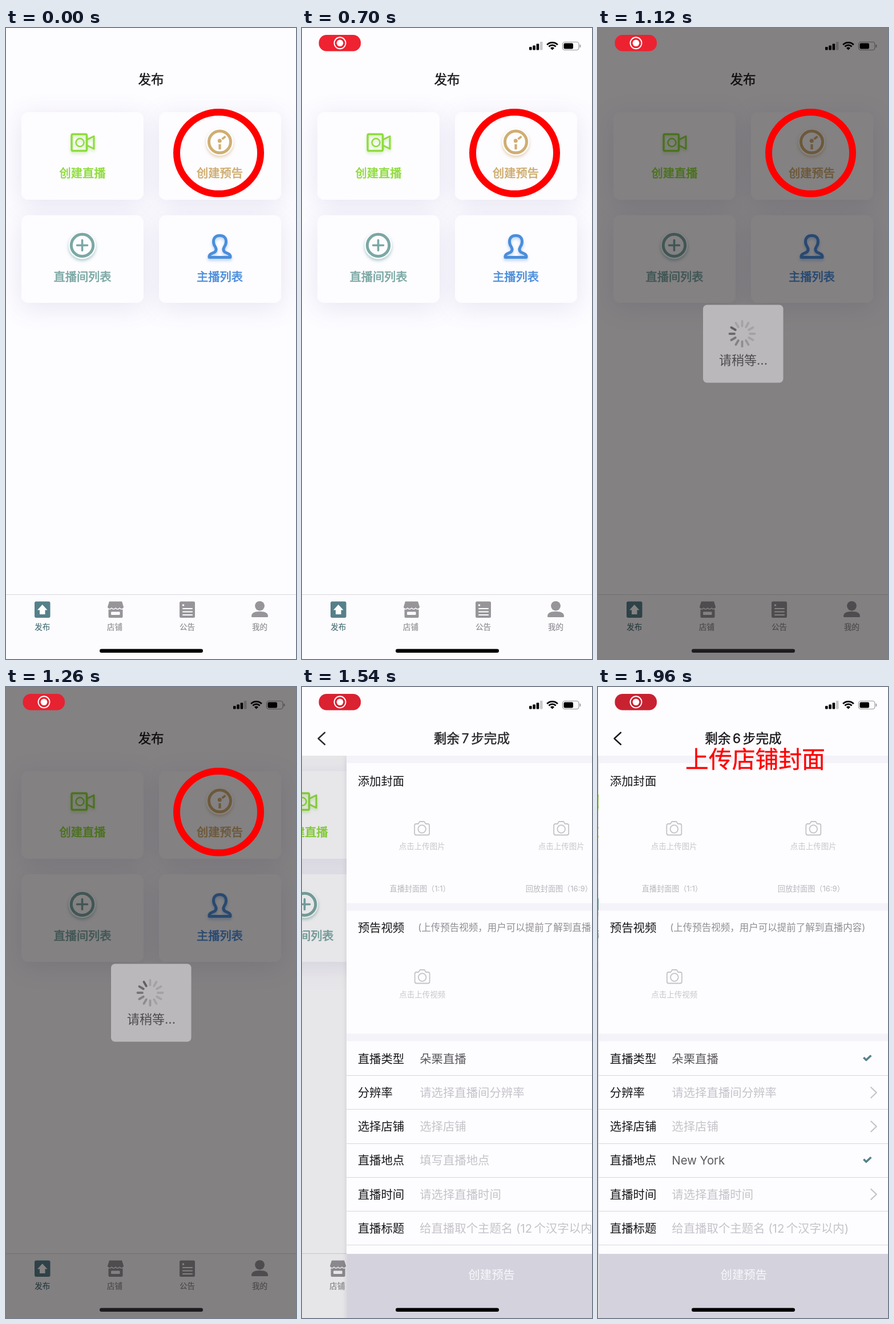
Write an HTML page with a canvas that moves like this. It is 508 px wide and 1102 px high and loops after 2100 ms.

```html
<!DOCTYPE html>
<html lang="zh-CN">
<head>
<meta charset="utf-8">
<style>
html, body { margin: 0; width: 100%; height: 100%; overflow: hidden; background: #fdfcff; }
canvas { display: block; width: 508px; height: 1102px; }
</style>
</head>
<body>
<canvas id="stage" width="508" height="1102" lang="zh-CN"></canvas>
<script>
const ctx = document.getElementById('stage').getContext('2d');
const W = 508, H = 1102, LOOP = 2100, STEP = 140;
const PAPER = '#fdfcff', INK = '#161517', GRAY = '#97959a', TEAL = '#56808a', PALE = '#c5c3c8';
const FONT = 'Inter, "Noto Sans CJK SC", "Noto Sans CJK", sans-serif';
const NAV_H = 120, TAB_Y = 990, PUSH_AT = 1400;

const clamp = v => Math.max(0, Math.min(1, v));

// y is the visual middle of the line; "bold" thickens the glyphs slightly.
function text(str, x, y, size, color, align = 'left', bold = 0) {
  ctx.font = `400 ${size}px ${FONT}`;
  ctx.textAlign = align;
  ctx.fillStyle = ctx.strokeStyle = color;
  ctx.fillText(str, x, y + size * 0.375);
  if (bold) {
    ctx.lineWidth = bold;
    ctx.strokeText(str, x, y + size * 0.375);
  }
}

function rect(x, y, w, h, color, r = 0) {
  ctx.fillStyle = color;
  ctx.beginPath();
  ctx.roundRect(x, y, w, h, r);
  ctx.fill();
}

function disc(x, y, r, color) {
  ctx.fillStyle = color;
  ctx.beginPath();
  ctx.arc(x, y, r, 0, 7);
  ctx.fill();
}

function stroke(path, color, width, cap = 'round') {
  ctx.strokeStyle = color;
  ctx.lineWidth = width;
  ctx.lineCap = cap;
  ctx.lineJoin = 'round';
  ctx.stroke(new Path2D(path));
}

function ring(x, y, r, color, width) {
  ctx.strokeStyle = color;
  ctx.lineWidth = width;
  ctx.beginPath();
  ctx.arc(x, y, r, 0, 7);
  ctx.stroke();
}

function layer(draw, { dx = 0, alpha = 1, shadow, blur = 0, drop = 0 } = {}) {
  ctx.save();
  ctx.translate(dx, 0);
  ctx.globalAlpha = alpha;
  if (shadow) {
    ctx.shadowColor = shadow;
    ctx.shadowBlur = blur;
    ctx.shadowOffsetY = drop;
  }
  draw();
  ctx.restore();
}

function drawCards() {
  const cards = [[27, 147], [268, 147], [27, 327], [268, 327]];
  const drawCard = ([x, y]) => rect(x, y, 214, 153, PAPER, 12);
  layer(() => cards.forEach(drawCard), { shadow: 'rgba(110,100,165,.15)', blur: 44, drop: 8 });
  cards.forEach(drawCard);

  const lift = color => ({ shadow: color, blur: 5, drop: 3 });
  layer(() => disc(374.5, 199, 24, PAPER), lift('rgba(207,174,114,.5)'));
  layer(() => disc(133.5, 379.5, 24, PAPER), lift('rgba(100,160,155,.5)'));

  const green = '#8edc3c', gold = '#cfae72', sage = '#7ba8a4', blue = '#4b8edb';
  layer(() => {
    stroke('M117 185.5H139.5Q141.5 185.5 141.5 188V212Q141.5 214.5 139.5 214.5H117Q115 214.5 115 212V188Q115 185.5 117 185.5Z', green, 3.4);
    stroke('M142 195L154 189V211L142 205', green, 3);
    ring(129.5, 200, 7, green, 2.4);
  }, lift('rgba(130,210,60,.4)'));

  ring(374.5, 199, 19, gold, 5);
  disc(374.3, 197, 3.5, gold);
  stroke('M378.5 194L384.5 189.5', gold, 3.6, 'butt');
  stroke('M374.5 203V212', gold, 4.2, 'butt');

  ring(133.5, 379.5, 19.2, sage, 5);
  stroke('M124.5 379.5H142.5M133.5 370.5V388.5', sage, 3.6);

  layer(() => stroke('M356 400.5Q355 396 361 393.5L365.5 391.5Q370 388 366.5 382Q363.5 378 363.5 373C363.5 366 368 362.5 374.5 362.5S385.5 366 385.5 373Q385.5 378 382.5 382Q379 388 383.5 391.5L388 393.5Q394 396 393 400.5Z', blue, 5),
    lift('rgba(75,142,219,.4)'));

  text('创建直播', 134, 253.5, 20.2, green, 'center', 0.7);
  text('创建预告', 374.5, 253.5, 20.2, gold, 'center', 0.7);
  text('直播间列表', 134, 434, 20.2, sage, 'center', 0.7);
  text('主播列表', 374.5, 434, 20.2, blue, 'center', 0.7);
}

function drawTabs() {
  rect(0, TAB_Y - 1, W, H - TAB_Y + 1, '#fcfbfe');
  rect(0, TAB_Y - 1, W, 1, '#d9d7dc');

  rect(50, 1001.5, 27.5, 28.5, TEAL, 3);
  ctx.fillStyle = '#fff';
  ctx.fill(new Path2D('M63.7 1007L72.5 1016.5H68.5V1024H59V1016.5H55Z'));

  rect(179.5, 1014, 25, 16, GRAY, 2);
  ctx.fillStyle = GRAY;
  ctx.fill(new Path2D('M181 1001.5H203L206 1011Q206 1014 203 1014H181Q178 1014 178 1011Z'));
  stroke('M178 1013q3.5 4 7 0q3.5 4 7 0q3.5 4 7 0q3.5 4 7 0', '#fcfbfe', 1.4);
  rect(184, 1019.5, 15.5, 5.5, '#fcfbfe', 1);

  rect(304, 1001.5, 27, 28.5, GRAY, 2.5);
  disc(310.5, 1008, 1.8, '#fff');
  stroke('M310 1014H326M310 1019.5H326M310 1025H326', '#fff', 2.2);

  disc(444.5, 1009.3, 8.4, GRAY);
  ctx.fillStyle = GRAY;
  ctx.fill(new Path2D('M430 1028Q429.5 1019 444.5 1019T459 1028Q459 1029 457 1029H432Q430 1029 430 1028Z'));

  ['发布', '店铺', '公告', '我的'].forEach((name, i) =>
    text(name, 63.7 + 126.9 * i, 1046, 13.5, i ? '#8e8c90' : '#456f75', 'center', 0.2));
}

function drawPhotoSlot(x, y, label) {
  stroke(`M${x - 10} ${y - 8}h3.5l2.5-4h8l2.5 4h3.5q3 0 3 3v13.5q0 3-3 3h-20q-3 0-3-3v-13.5q0-3 3-3z`, PALE, 1.8);
  ring(x, y + 1, 6.8, PALE, 1.8);
  text(label, x, y + 30.5, 13.5, '#c8c6ca', 'center');
}

function drawForm(located) {
  rect(0, NAV_H, W, H - NAV_H, PAPER);
  for (const y of [120, 377.5, 605.5]) rect(0, y, W, 13, '#f4f3f9');

  text('添加封面', 19.5, 164, 20.4, INK);
  drawPhotoSlot(132, 247, '点击上传图片');
  drawPhotoSlot(376, 247, '点击上传图片');
  text('直播封面图（1:1）', 128.5, 352, 13.1, '#b9b7bc', 'center');
  text('回放封面图（16:9）', 372, 352, 13.1, '#b9b7bc', 'center');

  text('预告视频', 19.5, 420, 20.4, INK);
  text('(上传预告视频，用户可以提前了解到直播内容)', 125, 420, 16.5, '#908e93');
  drawPhotoSlot(132.5, 506, '点击上传视频');

  const rows = [
    ['直播类型', '朵栗直播', 'check'],
    ['分辨率', '请选择直播间分辨率', 'more'],
    ['选择店铺', '选择店铺', 'more'],
    located ? ['直播地点', 'New York', 'check'] : ['直播地点', '填写直播地点', 'more'],
    ['直播时间', '请选择直播时间', 'more'],
    ['直播标题', '给直播取个主题名 (12\u2006个汉字以内)']
  ];
  rows.forEach(([label, value, mark], i) => {
    const y = 649 + 59.25 * i;
    text(label, 19.5, y, 20.4, INK);
    text(value, 128, y, 20.4, mark === 'check' ? '#5b595d' : PALE);
    if (mark === 'check') stroke(`M464 ${y - 2}l4.5 4.5l8.5-8`, TEAL, 3.6, 'butt');
    if (mark === 'more') stroke(`M477 ${y - 9}l9.5 9l-9.5 9`, PALE, 2.2);
    rect(0, Math.round(y + 29), W, 1, '#d8d6dc');
  });

  rect(0, TAB_Y, W, H - TAB_Y, '#d4d3dd');
  text('创建预告', 254, 1026, 20.4, '#f8f7fb', 'center');
}

function drawStatus(t) {
  [5.5, 8, 11, 14.5].forEach((h, i) =>
    rect(398 + 6.3 * i, 38.5 - h, 4.6, h, i < 3 ? '#000' : '#c9c7ca', 1));

  ctx.strokeStyle = ctx.fillStyle = '#000';
  ctx.lineWidth = 2.8;
  ctx.lineCap = 'butt';
  for (const r of [13.2, 8.6]) {
    ctx.beginPath();
    ctx.arc(438.5, 38.5, r, -Math.PI * 0.75, -Math.PI * 0.25);
    ctx.stroke();
  }
  ctx.beginPath();
  ctx.moveTo(438.5, 38.5);
  ctx.arc(438.5, 38.5, 5, -Math.PI * 0.75, -Math.PI * 0.25);
  ctx.fill();

  ctx.strokeStyle = '#99979b';
  ctx.lineWidth = 1.2;
  ctx.beginPath();
  ctx.roundRect(456.5, 24.5, 28.5, 14, 4);
  ctx.stroke();
  rect(458.5, 26.5, 16.5, 10, '#000', 2.2);
  rect(486.5, 29, 1.8, 5, '#99979b', 1);
}

function drawRecordPill(t) {
  const glow = Math.cos((t - 840) / 2800 * 2 * Math.PI);
  rect(29.5, 12, 73.5, 28.5, `rgb(${218 + 22 * glow},34,49)`, 13.5);
  ring(66.5, 26.3, 10, '#fff', 1.9);
  disc(66.5, 26.3, 5.8, '#fff');
}

function drawLoading(t) {
  rect(0, 0, W, H, 'rgba(6,0,2,.49)');
  rect(184, 483.5, 140.5, 136, '#bab8bb', 7);
  const head = 10 + Math.floor((t - 1120) / 83);
  for (let i = 0; i < 12; i++) {
    const age = (head - i + 24) % 12;
    const shade = Math.min(164, 98 + age * 11);
    const a = i * Math.PI / 6;
    const sin = Math.sin(a), cos = -Math.cos(a);
    stroke(`M${252.5 + 13.5 * sin} ${534 + 13.5 * cos}L${252.5 + 22 * sin} ${534 + 22 * cos}`,
      `rgb(${shade},${shade - 2},${shade})`, 3.8);
  }
  text('请稍等...', 254.5, 579.5, 22, '#4d4b4e', 'center');
}

function drawNav(t, pushed) {
  rect(0, 0, W, NAV_H, PAPER);
  const title = '发布';
  if (t < PUSH_AT) return text(title, 254, 90, 22.6, INK, 'center', 0.4);

  layer(() => text(title, 254, 90, 22.6, INK, 'center', 0.4), { alpha: clamp(1.3 - 1.35 * pushed) });
  layer(() => {
    stroke('M40 79.5L28.5 90L40 100.5', INK, 2.4);
    const left = t < 1820 ? 7 : 6;
    const dx = 209 * Math.exp((PUSH_AT - t) / 89);
    text(`剩余\u2006${left}\u2006步完成`, 254 + dx, 90, 22.6, INK, 'center', 0.4);
  }, { alpha: clamp(pushed * 1.08) });
}

function draw(t) {
  const pushing = t >= PUSH_AT;
  const pageX = pushing ? 305 * Math.exp((PUSH_AT - t) / 102.8) : W;
  const pushed = 1 - pageX / W;

  rect(0, 0, W, H, PAPER);
  if (!pushing) drawNav(t, 0);
  layer(() => { drawCards(); drawTabs(); }, { dx: -0.3 * (W - pageX) });

  if (pushing) {
    rect(0, NAV_H, W, H - NAV_H, `rgba(0,0,0,${0.1 * pushed})`);
    layer(() => rect(0, NAV_H, W, H, PAPER), { dx: pageX, shadow: 'rgba(0,0,0,.1)', blur: 10 });
    layer(() => drawForm(t >= 1680), { dx: pageX });
    drawNav(t, pushed);
  }

  if (t >= 420) drawStatus(t);
  const loading = t >= 1120 && !pushing;
  if (loading) drawLoading(t);
  if (t >= 420) drawRecordPill(t);
  rect(164, 1084.5, 181, 6.5, loading ? '#1e1c1f' : '#000', 3.25);

  if (t < 1540) {
    ctx.strokeStyle = '#f00';
    ctx.lineWidth = 12;
    ctx.beginPath();
    ctx.ellipse(372.5, 218.3, 73.5, 71.3, 0, 0, 7);
    ctx.stroke();
  }
  if (t >= 1960) text('上传店铺封面', 275.5, 125.5, 40.8, '#f00', 'center', 0.4);
}

function tick() {
  draw(Math.floor(performance.now() % LOOP / STEP) * STEP);
  requestAnimationFrame(tick);
}
tick();
</script>
</body>
</html>
```
